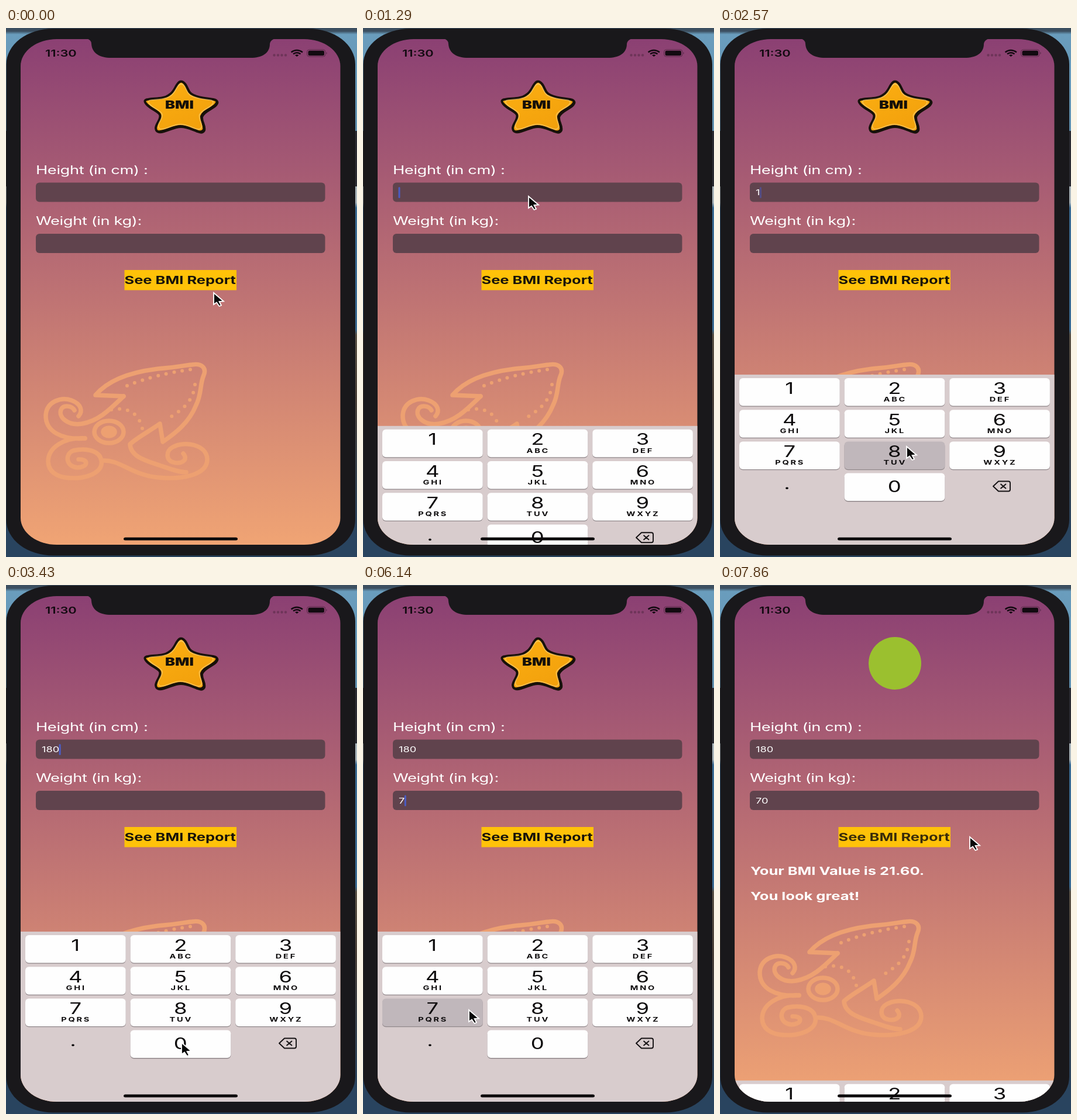
These frames come from a looping animation (600x905 px, 8000 ms). An HTML page:

```html
<!DOCTYPE html>
<html lang="en">
<head>
<meta charset="utf-8">
<title>BMI calculator</title>
<style>
  html, body { margin: 0; width: 100%; height: 100%; overflow: hidden; background: #19181b; }
  svg { display: block; width: 100%; height: 100%; }
  text { font-family: Inter, Roboto, sans-serif; white-space: pre; }
  .label { font-size: 18.7px; letter-spacing: -.25px; fill: #fff; }
  .value { font-size: 12.5px; fill: #fff; }
  .bold { font-size: 17.5px; font-weight: 700; }
  .clock { font-size: 15px; font-weight: 600; }
  .logo { font-size: 17.5px; font-weight: 900; }
  .digit { font-size: 25px; text-anchor: middle; }
  .letters { font-size: 10px; font-weight: 700; letter-spacing: 1.9px; text-anchor: middle; }
  .squid { fill: none; stroke: #eda071; stroke-width: 7.5; stroke-linecap: round; stroke-linejoin: round; }
  .dots { stroke-width: 6; stroke-dasharray: 0 14; }
</style>
</head>
<body>
<svg viewBox="0 0 600 905" preserveAspectRatio="none">
  <defs>
    <linearGradient id="sky" x2="0" y2="1">
      <stop stop-color="#8b4073"/><stop offset="1" stop-color="#f0a474"/>
    </linearGradient>
    <linearGradient id="desk" x2="0" y2="1">
      <stop offset=".006" stop-color="#3c4f60"/><stop offset=".012" stop-color="#6a9dbd"/>
      <stop offset=".195" stop-color="#5f8fae"/><stop offset=".195" stop-color="#2b2c33"/>
      <stop offset=".3" stop-color="#2b2c33"/><stop offset=".3" stop-color="#a9b4ba"/>
      <stop offset=".33" stop-color="#a9b4ba"/><stop offset=".34" stop-color="#3a6a92"/>
      <stop offset=".57" stop-color="#3a6a92"/><stop offset=".58" stop-color="#5b5347"/>
      <stop offset=".7" stop-color="#4a4038"/><stop offset=".95" stop-color="#29445f"/>
    </linearGradient>
    <linearGradient id="gold" x2=".7" y2="1">
      <stop stop-color="#ffc95a"/><stop offset=".3" stop-color="#f9ab10"/><stop offset="1" stop-color="#f2a00c"/>
    </linearGradient>
    <clipPath id="screen"><rect x="25" y="19" width="546.5" height="865" rx="62" ry="46"/></clipPath>
    <path id="starShape" d="M293 96Q299 87 306 96C311 104 311 111 321 115C332 120 341 120 354 122Q365 124 357 132C349 139 337 142 334 151C333 160 340 166 338 174Q335 180 326 176C315 172 308 168 298 168C288 168 280 173 269 176Q256 180 256 171C257 162 266 156 263 148C259 141 249 139 241 131Q233 123 243 122C257 120 270 121 278 115C287 110 288 103 293 96Z"/>
  </defs>

  <rect width="600" height="905" fill="url(#desk)"/>
  <rect x=".5" y="1" width="596.5" height="901.5" rx="80" ry="61" fill="#19181b"/>

  <g clip-path="url(#screen)">
    <rect x="25" y="19" width="547" height="865" fill="url(#sky)"/>

    <g class="squid">
      <path d="M201 630L153 628C175 602 215 587 270 582C295 580 305 577 318 576C335 573 343 582 338 594C331 610 335 625 325 645C312 678 285 696 268 708L263 677C245 690 225 700 212 712C213 733 238 740 262 748C280 754 295 760 308 760"/>
      <path d="M201 630C180 650 160 672 130 677C105 681 89 665 94 653C98 644 113 646 117 654"/>
      <path d="M135 702C95 705 67 690 68 662C70 638 95 631 112 637C128 643 132 655 124 664"/>
      <path d="M135 702C100 700 72 717 72 742C73 764 95 771 120 770C150 768 166 755 163 740C160 722 135 718 115 723C101 728 101 750 122 752C142 751 141 737 124 738"/>
      <path d="M165 740C195 738 215 765 260 769C300 773 345 765 344 737C342 712 305 706 285 717C273 723 273 740 286 743C301 747 312 738 303 728"/>
      <ellipse cx="176" cy="691" rx="25" ry="19"/>
      <ellipse cx="176" cy="691" rx="10" ry="7" fill="#eda071"/>
      <path class="dots" d="M207 612Q255 592 324 583"/>
      <path class="dots" d="M323 610C320 640 300 655 272 671"/>
      <path class="dots" d="M180 653Q226 645 234 690"/>
    </g>

    <g id="star">
      <use href="#starShape" fill="#17110a" stroke="#17110a" stroke-width="4" transform="translate(1 1)"/>
      <use href="#starShape" fill="url(#gold)" stroke="#17110a" stroke-width="4"/>
      <use href="#starShape" fill="none" stroke="#ffd98a" stroke-width="2" opacity=".5" transform="translate(299 134) scale(.9) translate(-299 -134)"/>
      <g data-text="logo" data-at="272 138">BMI</g>
    </g>
    <circle id="badge" cx="299" cy="134" r="45" fill="#9bc02f"/>

    <g fill="#60434d">
      <rect x="51" y="264.5" width="494.5" height="33" rx="6"/>
      <rect x="51" y="352" width="494.5" height="33" rx="6"/>
    </g>
    <rect x="202.5" y="414" width="191.5" height="34.5" fill="#ffc209"/>
    <rect id="caret" width="3" height="19" rx="1.5" fill="#4a5cc4"/>

    <g id="copy"></g>
    <g id="keyboard"></g>
    <rect x="201" y="871.5" width="195" height="5" rx="3" fill="#0b090a"/>
  </g>

  <path d="M137 18Q146 20 146 27C147 43 160 51 180 51H418C438 51 451 43 451 27Q452 20 461 18Z" fill="#19181b"/>
  <g fill="#120a10">
    <g opacity=".25">
      <circle cx="458.5" cy="46.5" r="2.2"/><circle cx="465" cy="46.5" r="2.2"/>
      <circle cx="471.5" cy="46.5" r="2.2"/><circle cx="478" cy="46.5" r="2.2"/>
    </g>
    <path d="M487.5 41.5Q497 34.5 507 41.5M491 44.5Q497 40 503.5 44.5" fill="none" stroke="#120a10" stroke-width="2.4"/>
    <path d="M494 46.5Q497 44.5 500.5 46.5L497.2 49Z"/>
    <rect x="514.5" y="37" width="31.5" height="12" rx="4" fill="none" stroke="#120a10" stroke-opacity=".4"/>
    <rect x="516.5" y="38.7" width="27.5" height="8.6" rx="2.5"/>
    <path d="M547.5 41q2.5 2 0 4z" opacity=".4"/>
  </g>
  <path id="cursor" d="M0 0V20L5 16.5 9.5 23 13 21.5 9.5 15 17 14.5Z" fill="#080808" stroke="#fff" stroke-width="1.8"/>
</svg>

<script>
const LOOP = 8000, FPS = 7;
const SCALE_X = 1.457, SCALE_Y = 1.066;   // the 375 x 812 pt screen fills a wider stage
const $ = id => document.getElementById(id);

function make(tag, parent, attrs = {}) {
  const node = document.createElementNS("http://www.w3.org/2000/svg", tag);
  for (const name in attrs) node.setAttribute(name, attrs[name]);
  return parent.appendChild(node);
}

function write(parent, cls, x, y, string, fill) {
  const node = make("text", parent, {
    class: cls, transform: `translate(${x} ${y}) scale(${SCALE_X} ${SCALE_Y})`
  });
  if (fill) node.setAttribute("fill", fill);
  node.textContent = string;
  return node;
}

for (const slot of document.querySelectorAll("[data-text]")) {
  const string = slot.textContent;
  slot.textContent = "";
  write(slot, slot.dataset.text, ...slot.dataset.at.split(" "), string, "#151009");
}

const copy = $("copy");
write(copy, "clock", 67, 49, "11:30", "#120a10");
write(copy, "label", 51, 250, "Height (in cm) :");
write(copy, "label", 51, 337, "Weight (in kg):");
const heightText = write(copy, "value", 61, 286, "");
const weightText = write(copy, "value", 61, 373.5, "");
const buttonText = write(copy, "bold", 202.5, 438, "See BMI Report", "#17130a");
const report = make("g", copy);
write(report, "bold", 52, 496, "Your BMI Value is 21.60.", "#fff");
write(report, "bold", 52, 539, "You look great!", "#fff");

// The keyboard is built with its top edge at y = 0.
const keyboard = $("keyboard"), keys = {};
make("rect", keyboard, { x: 25, width: 547, height: 300, fill: "#d8cccd" });
const letters = ["", "ABC", "DEF", "GHI", "JKL", "MNO", "PQRS", "TUV", "WXYZ"];
function addKey(digit, column, row, sub) {
  const x = 33 + column * 179.6, y = 6 + row * 54.2, middle = x + 85.7;
  const box = { x, width: 171.7, height: 47.5, rx: 6 };
  make("rect", keyboard, { ...box, y: y + 1.3, fill: "#90878a" });
  keys[digit] = make("rect", keyboard, { ...box, y });
  write(keyboard, "digit", middle, y + (digit ? 26.5 : 32), digit, "#0c0a0b");
  if (sub) write(keyboard, "letters", middle + 1, y + 40, sub, "#0c0a0b");
}
letters.forEach((sub, i) => addKey(i + 1, i % 3, Math.floor(i / 3), sub));
addKey(0, 1, 3);
write(keyboard, "digit", 114.5, 196, ".", "#0c0a0b");
make("path", keyboard, {
  d: "M476 182.5H493Q496 182.5 496 185.5V196.5Q496 199.5 493 199.5H476L467 191ZM479.5 187L489 195M489 187L479.5 195",
  fill: "none", stroke: "#141113", "stroke-width": 1.9, "stroke-linejoin": "round"
});

const pointer = [   // time, x, y
  [0, 355, 453], [430, 355, 453], [1000, 283, 288], [1400, 283, 288],
  [1860, 120, 625], [2150, 120, 625], [2550, 319, 716], [2720, 319, 716],
  [3200, 300, 783], [3440, 300, 783], [3950, 262, 372], [4290, 262, 372],
  [4710, 260, 662], [4900, 260, 662], [5700, 181, 727], [6150, 181, 727],
  [6600, 290, 783], [6860, 290, 783], [7400, 325, 425], [7600, 325, 425],
  [7857, 427, 431]
];
const presses = [[1, 1990, 2200], [8, 2560, 2700], [0, 3280, 3420], [7, 5990, 6280], [0, 6700, 6850]];
const entries = [   // time, height, weight
  [0, "", ""], [2140, "1", ""], [2700, "18", ""], [3420, "180", ""],
  [5990, "180", "7"], [6850, "180", "70"]
];
const FOCUS_HEIGHT = 1130, FOCUS_WEIGHT = 4280, KEYBOARD_IN = 1154;
const PRESS = 7560, SUBMIT = 7657, SLIDE = 400;

const clamp = v => Math.max(0, Math.min(1, v));
const easeOut = v => 1 - (1 - clamp(v)) ** 3;
const smooth = v => v * v * (3 - 2 * v);

function pointerAt(t) {
  const next = pointer.findIndex(p => p[0] > t);
  if (next < 0) return pointer.at(-1).slice(1);
  const [t0, x0, y0] = pointer[next - 1], [t1, x1, y1] = pointer[next];
  const k = smooth((t - t0) / (t1 - t0));
  return [x0 + (x1 - x0) * k, y0 + (y1 - y0) * k];
}

function drawCaret(t, entryTime) {
  const onWeight = t >= FOCUS_WEIGHT, field = onWeight ? weightText : heightText;
  const width = field.textContent ? field.getComputedTextLength() : 0;
  const idle = (t - Math.max(entryTime, onWeight ? FOCUS_WEIGHT : FOCUS_HEIGHT)) % 1000;
  const visible = t >= FOCUS_HEIGHT && t < SUBMIT;
  $("caret").setAttribute("x", 60.5 + width * SCALE_X);
  $("caret").setAttribute("y", onWeight ? 359.5 : 272);
  $("caret").setAttribute("opacity", visible ? clamp(Math.max((530 - idle) / 200, (idle - 900) / 100)) : 0);
}

function render(t) {
  const [x, y] = pointerAt(t);
  $("cursor").setAttribute("transform", `translate(${x} ${y})`);

  const raised = easeOut((t - KEYBOARD_IN) / SLIDE) - easeOut((t - SUBMIT) / SLIDE);
  keyboard.setAttribute("transform", `translate(0 ${884 - 291 * raised})`);
  for (const digit in keys) {
    const down = presses.some(([key, from, to]) => key == digit && t >= from && t < to);
    keys[digit].setAttribute("fill", down ? "#c0b7bb" : "#fefefe");
  }

  const [entryTime, height, weight] = entries.findLast(entry => t >= entry[0]);
  heightText.textContent = height;
  weightText.textContent = weight;
  drawCaret(t, entryTime);

  const done = t >= SUBMIT;
  $("star").style.display = done ? "none" : "";
  $("badge").style.display = report.style.display = done ? "" : "none";
  buttonText.setAttribute("opacity", t < PRESS ? 1 : .25 + .6 * clamp((t - SUBMIT) / 200));
}

function tick(now) {
  const step = Math.min(Math.floor((now % LOOP + 5) * FPS / 1000), LOOP * FPS / 1000 - 1);
  render(step * 1000 / FPS);
  requestAnimationFrame(tick);
}
render(0);
requestAnimationFrame(tick);
</script>
</body>
</html>
```
